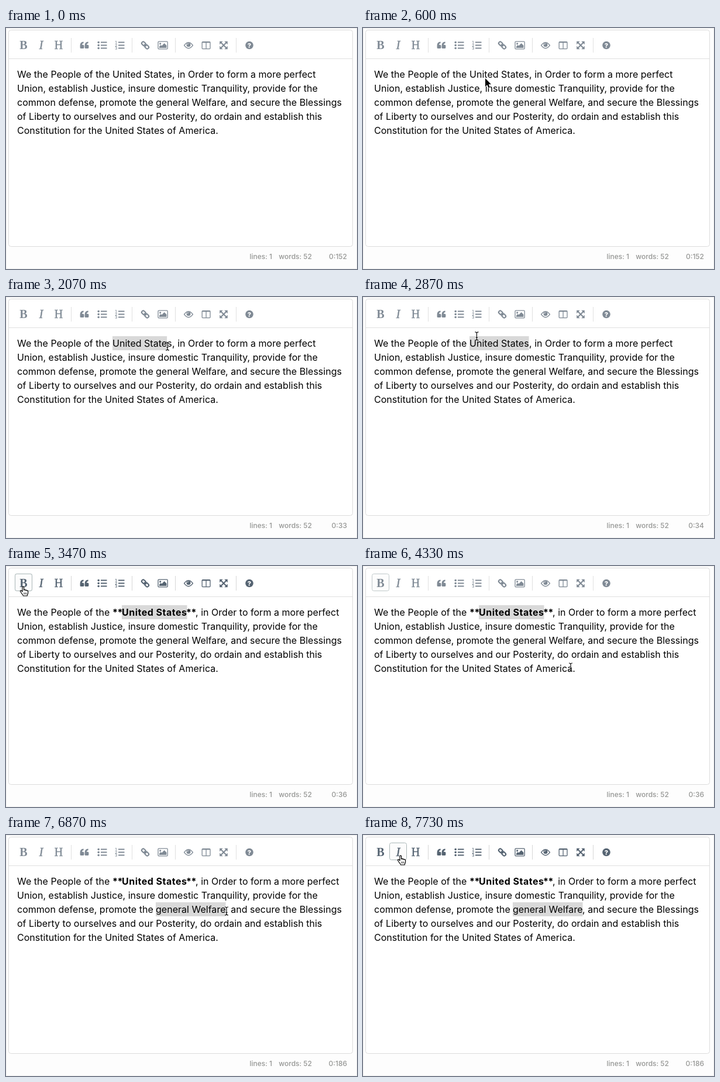
Animation of 600x412 px, one loop 8 s. Source, as an HTML page:

```html
<!DOCTYPE html>
<html lang="en">
<head>
<meta charset="utf-8">
<title>Markdown editor</title>
<style>
  html, body { margin: 0; width: 100%; height: 100%; overflow: hidden; background: #fdfdfd; }
  svg { display: block; width: 600px; height: 412px; }
  text { font-family: Inter, "Open Sans", sans-serif; white-space: pre; }
  #copy { font-size: 16px; letter-spacing: .02px; }
  #copy .bold { font-weight: 700; letter-spacing: .5px; }
  #copy .stars { letter-spacing: -.5px; }
  #status { font-size: 12px; font-weight: 500; fill: #959694; text-anchor: end; }
  #tools { fill: #2c3e50; }
  #tools .letter { font: 20px "Liberation Serif", "Noto Serif", serif; text-anchor: middle; stroke: #2c3e50; stroke-width: .45; }
  #tools .heavy { font-weight: 700; stroke: none; }
  #tools .slanted { font-style: italic; }
  #tools .line { fill: none; stroke: #2c3e50; }
  .button { fill: #fcfcfc; stroke: #95a5a6; }
</style>
</head>
<body>
<svg viewBox="0 0 600 412">
  <rect x=".5" y=".5" width="599" height="411" fill="#fdfdfd" stroke="#f0f0f0"/>
  <rect x="4.5" y="3.5" width="588" height="370" rx="4" fill="#fff" stroke="#dcdcdc"/>
  <path d="M5 52.5H592" stroke="#dfdfdf"/>

  <g id="tools">
    <rect id="active" class="button" x="15.5" y="13.5" width="29" height="29" rx="3"/>
    <rect id="hover" class="button" y="13.5" width="29" height="29" rx="3"/>
    <path d="M111.5 17V42M215.5 17V42M289.5 17V42M393.5 17V42" stroke="#ccc"/>
    <text class="letter heavy" x="30" y="36">B</text>
    <text class="letter slanted" x="60" y="36">I</text>
    <text class="letter" x="90" y="36">H</text>

    <path id="quote" d="M126.6 30Q126.6 23.8 132.6 23.6V26Q130 26.2 129.8 28.8H131.8Q133.4 28.8 133.4 30.3V33.4Q133.4 35 131.8 35H128.2Q126.6 35 126.6 33.4Z"/>
    <use href="#quote" x="8"/>

    <path id="bars" class="line" stroke-width="2.2" d="M162 24.5H172.5M162 29.5H172.5M162 34.5H172.5"/>
    <use href="#bars" x="30"/>
    <circle cx="158.2" cy="24.5" r="1.8"/><circle cx="158.2" cy="29.5" r="1.8"/><circle cx="158.2" cy="34.5" r="1.8"/>
    <g font-size="6.2" font-weight="600">
      <text x="186.5" y="26.6">1</text><text x="186.3" y="31.8">2</text><text x="186.3" y="37">3</text>
    </g>

    <g class="line" stroke-width="2.1" transform="rotate(45 238 29.5)">
      <rect x="230.6" y="26.9" width="7.2" height="5.2" rx="2.4"/>
      <rect x="238.2" y="26.9" width="7.2" height="5.2" rx="2.4"/>
      <path d="M235.5 29.5H240.5"/>
    </g>

    <rect class="line" x="260" y="23.2" width="16.2" height="12.6" rx="1.2" stroke-width="1.3"/>
    <circle cx="263.7" cy="26.8" r="1.6"/>
    <path d="M262 34V31.7L264.8 29L266.2 30.4L270.6 26L274.4 29.8V34Z"/>

    <path class="line" stroke-width="1.4" d="M304.6 29.7Q312 19.6 319.4 29.7Q312 39.8 304.6 29.7Z"/>
    <circle cx="312" cy="28.8" r="3.5"/>
    <path d="M310 28.8Q310 26.8 312 26.8" fill="none" stroke="#fff" stroke-width=".8"/>

    <rect class="line" x="335.2" y="23.6" width="13.8" height="12" rx="1" stroke-width="1.3"/>
    <path class="line" stroke-width="1.3" d="M335 24.6H349M342.1 24V36"/>

    <path class="line" stroke-width="2.1" d="M367 24.5L377 34.5M377 24.5L367 34.5"/>
    <path d="M365.2 22.7H370.7L365.2 28.2ZM378.8 22.7V28.2L373.3 22.7ZM365.2 36.3V30.8L370.7 36.3ZM378.8 36.3H373.3L378.8 30.8Z"/>

    <circle cx="416" cy="29.5" r="6.8"/>
    <text x="416" y="33.5" font-size="11" font-weight="800" fill="#fff" text-anchor="middle">?</text>
  </g>

  <rect id="selection" height="24" fill="#d9d9d9"/>
  <g id="copy">
    <text x="19" y="85">We the People of the</text>
    <text id="country" x="182" y="85">United States</text>
    <g id="marked" class="bold">
      <text class="stars" x="182" y="85">**</text>
      <text id="strong" x="198" y="85">United States</text>
      <text class="stars" x="308" y="85">**</text>
    </g>
    <text id="rest" y="85">, in Order to form a more perfect</text>
    <text x="19" y="109">Union, establish Justice, insure domestic Tranquility, provide for the</text>
    <text x="19" y="133">common defense, promote the</text>
    <text id="welfare" x="256" y="133">general Welfare</text>
    <text x="375" y="133">, and secure the Blessings</text>
    <text x="19" y="157">of Liberty to ourselves and our Posterity, do ordain and establish this</text>
    <text x="19" y="181">Constitution for the United States of America.</text>
  </g>
  <path id="caret" d="M332.5 116V138" stroke="#000"/>

  <g id="status">
    <text x="455" y="395">lines: 1</text>
    <text x="523" y="395">words: 52</text>
    <text id="position" x="583" y="395"></text>
  </g>

  <g id="pointer">
    <path id="arrow" d="M0 0V14.2L3.3 11.2L5.5 16.3L7.9 15.2L5.7 10.3H10Z" stroke="#fff" stroke-width="1.1" paint-order="stroke"/>
    <g id="beam" fill="none">
      <path d="M-3 -7Q0 -7 0 -5Q0 -7 3 -7M0 -5V5M-3 7Q0 7 0 5Q0 7 3 7M-1.5 2.5H1.5" stroke="#fff" stroke-opacity=".7" stroke-width="2.6"/>
      <path d="M-3 -7Q0 -7 0 -5Q0 -7 3 -7M0 -5V5M-3 7Q0 7 0 5Q0 7 3 7M-1.5 2.5H1.5" stroke="#000" stroke-width="1.1"/>
    </g>
    <g id="hand" transform="translate(-5 -1)" stroke="#000" stroke-width="1.2" stroke-linejoin="round">
      <path fill="#fff" d="M4 1.5C4 -.3 6.6 -.3 6.6 1.5V6.2C7 5 9 5.2 9 6.6C9.6 5.6 11.3 6 11.3 7.2C12 6.4 13.6 6.8 13.6 8.2V11C13.6 13 12.4 13.6 12.2 16H5.4C5.2 14 3 12.5 1.6 10.2C.6 8.8 -.2 7.9 .5 7.2C1.4 6.3 3 7.4 4 8.8Z"/>
      <path d="M6.8 10.5V13.5M8.8 10.5V13.5M10.8 10.5V13.5" stroke-width=".8"/>
    </g>
  </g>
</svg>
<script>
  const LOOP = 8000, BLINK = 530;
  const DRAG_COUNTRY = 1730, MAKE_BOLD = 3470, CLICK = 4730, DRAG_WELFARE = 5930;
  const BUTTONS = [30, 60, 90, 134, 164, 194, 238, 268, 312, 342, 372, 416];

  // time, x, y of the pointer's hot spot
  const PATH = [
    [70, 430, 300], [600, 209, 86], [870, 190, 84], [1330, 182, 84], [1730, 182, 84],
    [2070, 276, 84], [2530, 286, 84], [2600, 286, 84], [3270, 29, 36], [3670, 29, 36],
    [4330, 355, 173], [4470, 358, 174], [4530, 358, 174], [4730, 332, 129], [5070, 332, 129],
    [5870, 258, 130], [5930, 256, 130], [6530, 377, 130], [6870, 377, 130],
    [7670, 75, 41], [7730, 64, 36]
  ];

  const el = Object.fromEntries([...document.querySelectorAll('[id]')].map(e => [e.id, e]));
  const show = (node, on) => node.setAttribute('visibility', on ? 'inherit' : 'hidden');
  const set = (node, attrs) => Object.entries(attrs).forEach(([k, v]) => node.setAttribute(k, v));

  function pointerAt(t) {
    const next = PATH.findIndex(p => p[0] > t);
    if (next === 0) return PATH[0].slice(1);
    if (next < 0) return PATH[PATH.length - 1].slice(1);
    const [t0, x0, y0] = PATH[next - 1], [t1, x1, y1] = PATH[next];
    const u = (t - t0) / (t1 - t0), e = u * u * (3 - 2 * u);
    return [x0 + (x1 - x0) * e, y0 + (y1 - y0) * e];
  }

  function charsUnder(x, left, width, count) {
    return Math.max(0, Math.min(count, Math.round((x - left) / width * count)));
  }

  function select(node, count) {
    set(el.selection, {
      x: node.getAttribute('x'),
      y: node.getAttribute('y') - 18,
      width: count ? node.getSubStringLength(0, count) : 0
    });
  }

  function drawSelection(t, x) {
    let position = 152;
    if (t < DRAG_COUNTRY) {
      select(el.country, 0);
    } else if (t < MAKE_BOLD) {
      const n = t < 2600 ? charsUnder(x, 182, 103, 13) : 13;
      select(el.country, n);
      position = 21 + n;
    } else if (t < CLICK) {
      select(el.strong, 13);
      position = 36;
    } else if (t < DRAG_WELFARE) {
      select(el.welfare, 0);
      position = 180;
    } else {
      const n = t < 6600 ? charsUnder(x, 256, 119, 15) : 15;
      select(el.welfare, n);
      position = 171 + n;
    }
    el.position.textContent = '0:' + position;
  }

  function draw(t) {
    const [x, y] = pointerAt(t);
    const bold = t >= MAKE_BOLD;
    drawSelection(t, x);
    show(el.country, !bold);
    show(el.marked, bold);
    set(el.rest, { x: bold ? 324 : 284 });
    show(el.caret, t >= CLICK && t < DRAG_WELFARE && Math.floor((t - CLICK) / BLINK) % 2 === 0);

    const button = y < 44 ? BUTTONS.find(c => Math.abs(x - c) < 15) : undefined;
    set(el.tools, { opacity: y < 52 ? .8 : .6 });
    show(el.active, bold && t < CLICK);
    show(el.hover, button !== undefined);
    if (button !== undefined) set(el.hover, { x: button - 14.5 });

    const kind = button !== undefined ? 'hand' : t < 670 || y < 64 ? 'arrow' : 'beam';
    for (const name of ['hand', 'arrow', 'beam']) show(el[name], name === kind);
    show(el.pointer, t >= 70);
    set(el.pointer, { transform: `translate(${x} ${y})` });
  }

  let start;
  function tick(now) {
    start ??= now;
    draw((now - start) % LOOP);
    requestAnimationFrame(tick);
  }
  draw(0);
  requestAnimationFrame(tick);
</script>
</body>
</html>
```
